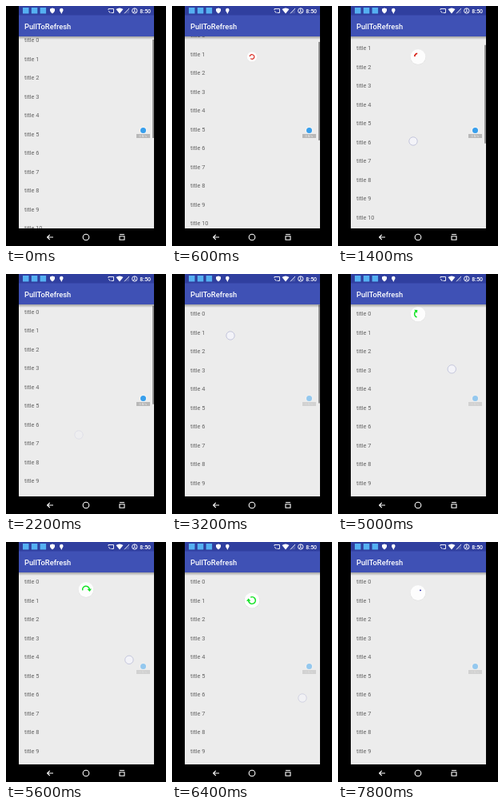
An HTML page with a canvas for the animation above (8 s loop, 200 by 300 pixels).

```html
<!DOCTYPE html>
<html lang="en">
<head>
<meta charset="utf-8">
<title>PullToRefresh</title>
<style>
html, body { margin: 0; width: 100%; height: 100%; overflow: hidden; background: #000; }
canvas { display: block; width: 200px; height: 300px; }
</style>
</head>
<body>
<canvas id="stage" width="200" height="300"></canvas>
<script>
const LOOP = 8000, STEP = 200, CYCLE = 1333, ROW = 23.5;
const PULL_START = 3200, PULL_END = 6400;
const RED = '#d81e14', GREEN = '#12e324', BLUE = '#2626a8';
const ctx = document.getElementById('stage').getContext('2d');

const clamp = x => Math.min(1, Math.max(0, x));
const ramp = (t, from, to) => clamp((t - from) / (to - from));
const ease = x => x < .5 ? 4 * x ** 3 : 1 - 4 * (1 - x) ** 3;
const presence = (t, start, end) => ramp(t, start, start + 200) - ramp(t, end, end + 300);
const rad = deg => deg * Math.PI / 180;

function rect(x, y, w, h, color) {
  ctx.fillStyle = color;
  ctx.fillRect(x, y, w, h);
}
function disc(x, y, r, color) {
  ctx.fillStyle = color;
  ctx.beginPath();
  ctx.arc(x, y, r, 0, 7);
  ctx.fill();
}
function ring(x, y, r, color, width) {
  ctx.strokeStyle = color;
  ctx.lineWidth = width;
  ctx.beginPath();
  ctx.arc(x, y, r, 0, 7);
  ctx.stroke();
}
function fillPath(d, color = '#fff') {
  ctx.fillStyle = color;
  ctx.fill(new Path2D(d));
}
function strokePath(d, width = 1) {
  ctx.strokeStyle = '#fff';
  ctx.lineWidth = width;
  ctx.stroke(new Path2D(d));
}
function text(s, x, y, size, color, weight = 400) {
  ctx.font = `${weight} ${size}px Roboto, sans-serif`;
  ctx.fillStyle = color;
  ctx.fillText(s, x, y);
}
function withAlpha(alpha, draw) {
  ctx.globalAlpha = alpha;
  draw();
  ctx.globalAlpha = 1;
}

function drawList(t) {
  rect(16, 38, 169, 240, '#ececec');
  const scroll = 7 + 13.5 * ramp(t, 0, 1400) - 18 * ramp(t, 1400, 1800) - 2.5 * ramp(t, 2200, 2600);
  for (let i = 0; i < 12; i++) text('title ' + i, 23, 52.2 + i * ROW - scroll, 7.4, '#626262');
  withAlpha(1 - ramp(t, 3400, 4000), () => rect(183, 38.5 + scroll / 2, 2, 123, '#8f8f8f'));
}

function drawSpinner(y, scale, start, sweep, color, arrow) {
  ctx.save();
  ctx.translate(100, y);
  ctx.scale(scale, scale);
  disc(0, .4, 9.7, 'rgba(0,0,0,.05)');
  disc(0, 0, 9.4, '#fdfdfd');
  ctx.strokeStyle = color;
  ctx.lineWidth = 1.6;
  ctx.beginPath();
  ctx.arc(0, 0, 4.3, rad(start), rad(start + sweep));
  ctx.stroke();
  if (arrow) {
    ctx.rotate(rad(start + sweep));
    fillPath('M1.6 -.3H7L4.3 2.8Z', color);
  }
  ctx.restore();
}

// Head runs ahead in the first half of a cycle, tail catches up in the second.
function drawRefreshing(y, scale, elapsed, offset, colors, startFull) {
  const cycle = Math.floor(elapsed / CYCLE), p = elapsed / CYCLE - cycle;
  const head = startFull && cycle === 0 ? 1 : ease(clamp(2 * p));
  const tail = ease(clamp(2 * p - 1));
  const start = offset + 288 * (cycle + tail) + 125 * elapsed / CYCLE;
  drawSpinner(y, scale, start, 20 + 288 * (head - tail), colors[cycle % colors.length]);
}

function drawSpinners(t) {
  const scale = ramp(t, 400, 700) - ramp(t, 1600, 1900);
  if (scale > 0) drawRefreshing(63.5, scale, t + 173, 110, [RED]);

  const pull = ramp(t, PULL_START, PULL_END);
  const y = 28 + 45 * pull ** 1.24 - 9.5 * ramp(t, PULL_END, PULL_END + 400);
  if (pull === 1) drawRefreshing(y, 1, t - PULL_END, 245, [GREEN, BLUE], true);
  if (t === PULL_END || pull < 1) drawSpinner(y, 1, 308 * pull - 63, 290 * pull ** 1.53, GREEN, true);
}

function drawWidget(t) {
  withAlpha(1 - ramp(t, 2600, 3000) / 2, () => {
    rect(163, 160, 17, 5, '#b8b8b8');
    text('0 B/s', 166.5, 164.2, 4, '#eee');
    disc(171.5, 155.5, 4.6, '#f6f6f6');
    disc(171.5, 155.5, 3.5, '#389fec');
  });
}

function drawTouch(x, y, alpha) {
  withAlpha(alpha, () => {
    disc(x, y, 5.2, '#f3f3f8');
    ring(x, y, 5.2, '#b9bbd6', .8);
  });
}

function drawTouches(t) {
  const swipe = (t - 1400) / 800;
  drawTouch(94 - 3 * swipe, 169 + 32 * swipe + 100 * Math.sin(Math.PI * swipe), presence(t, 1100, 2000));
  const pull = ramp(t, PULL_START, PULL_END);
  const bow = 19 * Math.sin(Math.PI * pull);
  drawTouch(73 + 90 * pull + bow, 77 + 118 * pull ** 1.8, presence(t, 2800, 6300));
}

function drawBars() {
  const shadow = ctx.createLinearGradient(0, 38, 0, 42);
  shadow.addColorStop(0, 'rgba(0,0,0,.32)');
  shadow.addColorStop(1, 'rgba(0,0,0,0)');
  rect(16, 38, 169, 4, shadow);
  rect(16, 0, 169, 12, '#303f9f');
  rect(16, 11.5, 169, 26.5, '#3f51b5');
  text('PullToRefresh', 23, 28.5, 9.3, '#fff', 500);

  for (let i = 0; i < 3; i++) rect(21 + 10.8 * i, 2, 7.5, 7.5, '#55b0f2');
  fillPath('M55 3.5L58 2.5L61 3.5V6Q60 8.5 58 9.5Q56 8.5 55 6Z');
  disc(69.3, 5, 2.3, '#fff');
  fillPath('M67.4 6H71.2L69.3 10Z');
  strokePath('M128 5V3.5H134.5V8.5H131.5M128 6.5Q130 6.8 130.2 8.8', .9);
  fillPath('M137.5 4Q142 .8 146.5 4L142 9.5Z');
  fillPath('M154 2.5V9.3H147.5Z', '#4b59ac');
  strokePath('M148 9.3L154 3', .8);
  ring(160.8, 6, 3.2, '#fff', .9);
  strokePath('M160.8 3V6.5L159 8M160.8 6.5L162.6 8', .9);
  text('8:50', 167.3, 8.6, 7, '#fff', 500);

  rect(0, 278, 200, 22, '#000');
  strokePath('M59 289H51.7M54.8 285.8L51.6 289L54.8 292.2', 1.1);
  ring(100, 289, 3.8, '#fff', 1.1);
  strokePath('M142 287.8H148V292.3H142ZM142 285.5H148', 1.1);
}

function frame(now) {
  const t = Math.floor(now % LOOP / STEP) * STEP;
  rect(0, 0, 200, 300, '#000');
  drawList(t);
  drawSpinners(t);
  drawBars();
  drawWidget(t);
  drawTouches(t);
  requestAnimationFrame(frame);
}
requestAnimationFrame(frame);
</script>
</body>
</html>
```
